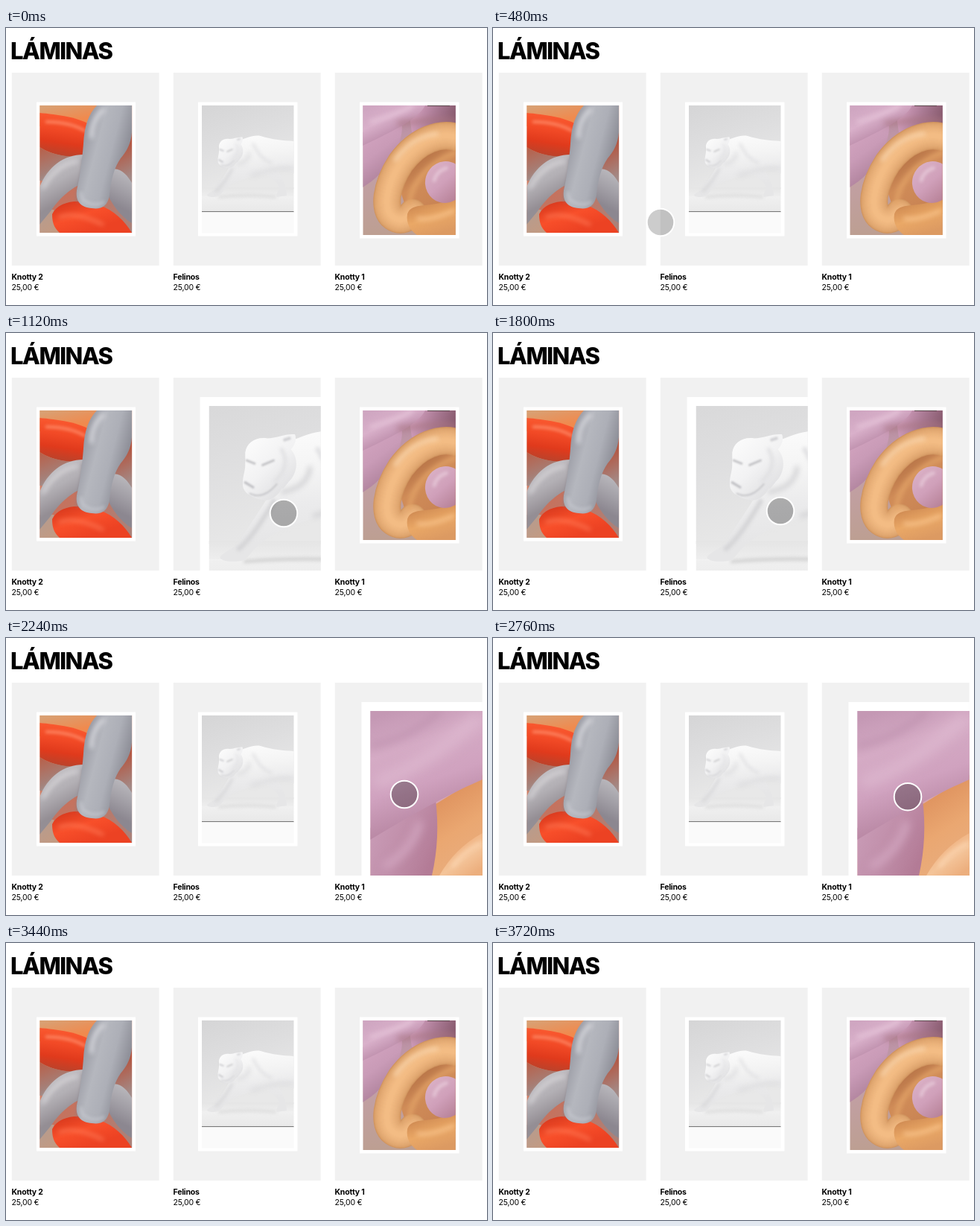
An HTML page with a canvas for the animation above (3880 ms loop, 646 by 372 pixels).

```html
<!DOCTYPE html>
<html lang="es">
<head>
<meta charset="utf-8">
<title>Láminas</title>
<style>
  html, body { margin: 0; width: 646px; height: 372px; overflow: hidden; background: #fff; }
  body { position: relative; font-family: Inter, "Liberation Sans", sans-serif; color: #000; }
  canvas { position: absolute; left: 0; top: 0; }
  h1, p { position: absolute; margin: 0; white-space: nowrap; }
  h1 { left: 6px; top: 11px; font-size: 31px; line-height: 40px; font-weight: 800; letter-spacing: -1.5px; }
  p { font-size: 10.5px; line-height: 14px; letter-spacing: -.2px; }
  .name { top: 328px; font-weight: 700; }
  .price { top: 342px; }
</style>
</head>
<body>
<canvas id="stage" width="646" height="372"></canvas>
<h1>LÁMINAS</h1>
<script>
const LOOP = 3880, STEP = 40;
const CARD = { y: 60, w: 198.3, h: 259 };
const stage = document.getElementById('stage').getContext('2d');
let g = stage;

function fillOf(line, colors) {
  if (colors.length === 1) return colors[0];
  const grad = g.createLinearGradient(...line);
  colors.forEach((c, i) => grad.addColorStop(i / (colors.length - 1), c));
  return grad;
}

function shape(path, line, ...colors) {
  g.fillStyle = fillOf(line, colors);
  g.fill(new Path2D(path));
}

function box(x, y, w, h, line, ...colors) {
  g.fillStyle = fillOf(line, colors);
  g.fillRect(x, y, w, h);
}

// Blurred stroke, for highlights and shadows
function glow(path, color, width, blur) {
  g.save();
  g.filter = `blur(${blur}px)`;
  g.strokeStyle = color;
  g.lineWidth = width;
  g.lineCap = 'round';
  g.stroke(new Path2D(path));
  g.restore();
}

// Rounded tube: narrowing strokes from edge colour to core colour
function tube(path, width, edge, core) {
  const p = new Path2D(path), steps = 16;
  g.lineCap = 'round';
  for (let i = 0; i < steps; i++) {
    const u = i / (steps - 1);
    g.lineWidth = width * (1 - u * .85);
    g.strokeStyle = `rgb(${edge.map((c, k) => c + (core[k] - c) * Math.sqrt(u)).join()})`;
    g.stroke(p);
  }
}

function clipped(x, y, w, h, draw) {
  g.save();
  g.beginPath();
  g.rect(x, y, w, h);
  g.clip();
  draw();
  g.restore();
}

function greyTwist() {
  box(45, 104, 125, 172, [45, 104, 169, 275], '#d99a70', '#c9705a', '#a8837c');
  shape('M45 104H125V132H45Z', [60, 104, 66, 130], '#d9a073', '#f08a4e');
  shape('M45 114C68 116 100 120 116 132L108 174C88 174 64 172 45 160Z', [80, 118, 72, 172], '#f9582f', '#f24a26', '#e03a1c', '#b8432c');
  glow('M54 126C74 126 92 130 106 138', '#ff9472', 3, 2);
  shape('M45 160C64 172 88 174 106 172V205H45Z', [45, 162, 60, 200], '#b8604a', '#a08884');
  shape('M140 175L169 135V215H140Z', [148, 160, 169, 200], '#b5523c', '#a38b88');
  shape('M45 244H64L84 275H45Z', [45, 248, 65, 275], '#b59c8f', '#c39a82');
  shape('M62 250C70 232 100 228 125 238C145 244 160 260 169 275H72C64 268 62 260 62 250Z', [90, 230, 105, 275], '#d93a1e', '#f84f2a', '#ec4223');
  glow('M72 254C88 248 108 253 130 264', '#ff7f5c', 3, 3);
  shape('M45 214C56 186 78 170 104 170L108 208C92 210 72 228 60 246L45 264Z', [58, 180, 84, 228], '#c4c1c5', '#b3b0b5', '#948e94');
  glow('M50 214C62 193 78 182 95 179', '#d9d7da', 4, 3);
  shape('M140 190C154 186 163 198 169 208V262C155 254 142 238 134 218Z', [160, 196, 140, 234], '#b7b5ba', '#a29fa6', '#8c8790');
  glow('M104 176C103 200 97 212 97 232', '#857f86', 3, 2);
  shape('M122 104H169V140C168 155 162 166 154 175C145 188 141 204 139 224C137 240 127 244 115 242C101 241 93 233 95 218C99 200 102 180 104 155C105 132 111 115 122 104Z',
    [100, 165, 158, 180], '#9b9ca5', '#b5b7be', '#adafb7', '#8f9099');
  glow('M115 146C115 130 121 118 131 110', '#d9dadf', 5, 3);
  glow('M101 221C100 236 120 240 131 234', '#c3c5cc', 3, 2);
}

function bigCat() {
  box(263, 104, 180, 112, [263, 104, 300, 214], '#d5d5d6', '#dededf', '#e8e8e8');
  box(263, 214, 180, 12, [263, 214, 263, 226], '#e5e5e5', '#eeeeee');
  box(263, 226, 180, 20, [263, 226, 263, 246], '#f0f0f0', '#e9e9e9');
  box(263, 246, 180, 1.3, [], '#777');
  box(263, 247.3, 180, 40, [], '#fafafa');
  glow('M286 227C310 225 340 225 362 227', '#cfcfcf', 2, 2);
  shape('M312 152C322 148 332 143 342 145C358 150 372 151 386 152H430V195H386C380 190 372 190 366 193C374 205 376 214 377 225L364 227C361 222 368 220 366 212C360 202 352 196 340 198C322 201 306 206 292 219L286 226C278 228 270 227 270 224C274 220 278 219 281 216C288 205 296 194 303 182Z',
    [320, 148, 326, 212], '#fafafa', '#f4f4f4', '#ebebec', '#e6e6e7');
  glow('M304 189C296 203 288 214 282 219', '#d5d5d7', 3, 2);
  glow('M310 183C320 181 326 176 327 168', '#d6d6d8', 3, 3);
  glow('M332 156C338 168 346 178 356 181', '#e1e1e3', 3, 2);
  glow('M330 198C350 192 366 187 386 189', '#d6d6d8', 3, 3);
  shape('M286 158C287 152 292 148 300 149C306 149 311 146 317.5 146.5C319 150 317 154 315 156C320 162 319 170 315 175C312 178 311 181 309 181C306 187 300 189 297 188C291 187 285 184 284.5 179C284 174 286 170 286 166Z',
    [288, 152, 315, 181], '#fbfbfb', '#f2f2f3', '#dfdfe1');
  glow('M309 156C313 162 312 170 305 176', '#e0e0e2', 2, 2);
  glow('M287 163L292 165M297 166L304 163', '#c4c4c7', 1.4, 1);
  glow('M286 177L291 180', '#c2c2c6', 1.6, 1);
  glow('M289 184C295 187 301 184 306 178', '#c8c8cb', 1, 1);
  glow('M311 150L314 149', '#d3d3d6', 2, 1);
}

function peachTwist() {
  box(479, 104, 125, 175, [490, 104, 500, 278], '#b98ca6', '#c29fa6', '#bd9f92');
  shape('M540 104H604V150L545 140Z', [550, 110, 604, 126], '#cf9dbb', '#a87892', '#86596c');
  shape('M479 140C500 126 518 122 532 132C532 160 512 194 479 214Z', [485, 140, 520, 188], '#d2a3bf', '#c99bb7', '#b2859f');
  shape('M479 104H563C555 120 528 135 479 158Z', [495, 104, 515, 145], '#cfa6c1', '#d9b0ca', '#bd8eab');
  glow('M490 126C512 119 530 114 545 105', '#e6c6da', 4, 3);
  glow('M528 128C555 126 580 120 606 126', '#a87480', 5, 4);
  shape('M525 205L560 160H604V250H540Z', [535, 175, 580, 235], '#ab683f', '#d08c58', '#c98454');
  tube('M612 149C584 137 552 151 530 181C510 212 506 244 520 254C530 261 540 256 546 248', 37, [208, 148, 94], [243, 188, 132]);
  shape('M539 250C545 232 568 244 604 228V278H552C543 272 537 262 539 250Z', [560, 234, 574, 278], '#cf8a52', '#eaa866', '#dc9a62');
  glow('M541 236C545 212 560 184 606 166', '#e3a468', 5, 3);
  g.fillStyle = fillOf([570, 185, 606, 228], ['#dab0c5', '#d0a0ba', '#b88399']);
  g.beginPath();
  g.ellipse(590, 207, 27, 28, .3, 0, 7);
  g.fill();
  glow('M575 205C577 196 584 190 592 188', '#e6c8d8', 4, 2);
  glow('M523 177C538 156 557 144 579 142', '#fbdab4', 4, 3);
  glow('M553 256C566 258 582 254 600 246', '#f7c48f', 4, 3);
  box(566, 104, 30, 1, [], '#5c464c');
}

function peachDetail() {
  box(489, 98, 151, 221, [500, 110, 620, 310], '#cb9dbb', '#d5a5ba', '#e8ab7e');
  shape('M574 225L640 184V319H565Z', [580, 215, 635, 300], '#df935f', '#eaa771', '#e9ad7e');
  shape('M489 255C525 240 555 224 577 217C581 250 580 285 572 319H489Z', [495, 255, 576, 290], '#c89ab5', '#c08ea9', '#b37b96');
  glow('M510 306C533 292 548 273 555 250', '#d2a6c0', 9, 6);
  shape('M489 98H640V190C605 205 555 231 489 271Z', [520, 98, 570, 245], '#c498b4', '#d5abc5', '#d0a2bf', '#b988a4');
  glow('M500 193C545 178 595 143 633 108', '#deb9d0', 14, 9);
  glow('M490 145C530 137 560 119 582 99', '#bd90ad', 6, 6);
  shape('M582 319C595 296 615 275 640 262V319Z', [598, 280, 625, 319], '#f0b07e', '#f4c499', '#ecae7d');
  glow('M600 306C611 292 624 282 637 276', '#fddab8', 4, 3);
}

function catDetail() {
  g.translate(272.5, 46);
  g.scale(2.12, 2.12);
  g.translate(-263, -104);
  bigCat();
}

const cards = [
  { x: 7.5, name: 'Knotty 2', frame: [41, 99.5, 133, 180], photo: [45.5, 104, 123.7, 171], art: greyTwist },
  { x: 224.5, name: 'Felinos', frame: [258, 99.5, 133.5, 180], photo: [262.5, 104, 124, 171.5], art: bigCat,
    detail: catDetail, hover: [600, 1960] },
  { x: 441.5, name: 'Knotty 1', frame: [475, 99.5, 133.5, 183], photo: [479.5, 104, 124.3, 174], art: peachTwist,
    detail: peachDetail, hover: [2000, 3400] },
];

function render(card, close) {
  const canvas = document.createElement('canvas');
  canvas.width = 646;
  canvas.height = 372;
  g = canvas.getContext('2d');
  clipped(card.x, CARD.y, CARD.w, CARD.h, () => {
    box(card.x, CARD.y, CARD.w, CARD.h, [], '#f1f1f1');
    if (close) {
      box(card.x + 36, 86, CARD.w, CARD.h, [], '#fff');
      clipped(card.x + 48, 98, CARD.w, CARD.h, card.detail);
    } else {
      box(...card.frame, [], '#fff');
      clipped(...card.photo, card.art);
    }
  });
  return canvas;
}

function addText(cls, text, x) {
  const p = document.createElement('p');
  p.className = cls;
  p.textContent = text;
  p.style.left = x + 'px';
  document.body.append(p);
}

for (const card of cards) {
  card.rest = render(card, false);
  if (card.detail) card.close = render(card, true);
  addText('name', card.name, card.x);
  addText('price', '25,00 €', card.x);
}

// Pointer stops: time, x, y
const path = [
  [0, -40, 293], [60, -18, 291], [280, 98, 278], [480, 225, 261], [640, 298, 251], [880, 358, 243],
  [1120, 373, 242], [1800, 386, 239], [1960, 430, 226], [2080, 487, 215], [2240, 535, 210],
  [2600, 553, 212], [3200, 568, 216], [3300, 603, 215], [3440, 672, 214], [LOOP, 700, 214],
];

const slope = (i, k) => (path[i + 1][k] - path[i][k]) / (path[i + 1][0] - path[i][0]);

function tangent(i, k) {
  if (i === 0 || i === path.length - 1) return 0;
  const a = slope(i - 1, k), b = slope(i, k);
  return a * b > 0 ? 2 * a * b / (a + b) : 0;
}

function pointerAt(t) {
  const i = path.findIndex((p, n) => n < path.length - 1 && t < path[n + 1][0]);
  const d = path[i + 1][0] - path[i][0], u = (t - path[i][0]) / d, v = 1 - u;
  return [1, 2].map(k =>
    path[i][k] * (1 + 2 * u) * v * v + path[i + 1][k] * (3 - 2 * u) * u * u +
    d * u * v * (tangent(i, k) * v - tangent(i + 1, k) * u));
}

function draw(t) {
  stage.fillStyle = '#fff';
  stage.fillRect(0, 0, 646, 372);
  let hovering = false;
  for (const card of cards) {
    const on = card.hover && t >= card.hover[0] && t < card.hover[1];
    hovering ||= on;
    stage.drawImage(on ? card.close : card.rest, 0, 0);
  }
  const [x, y] = pointerAt(t);
  stage.beginPath();
  stage.arc(x, y, 18.3, 0, 7);
  stage.fillStyle = `rgba(0,0,0,${hovering ? .28 : .2})`;
  stage.fill();
  stage.strokeStyle = '#fff';
  stage.lineWidth = 2;
  stage.stroke();
}

const start = performance.now();
function tick() {
  const t = (performance.now() - start) % LOOP;
  draw(Math.floor(t / STEP) * STEP);
  requestAnimationFrame(tick);
}
tick();
</script>
</body>
</html>
```
